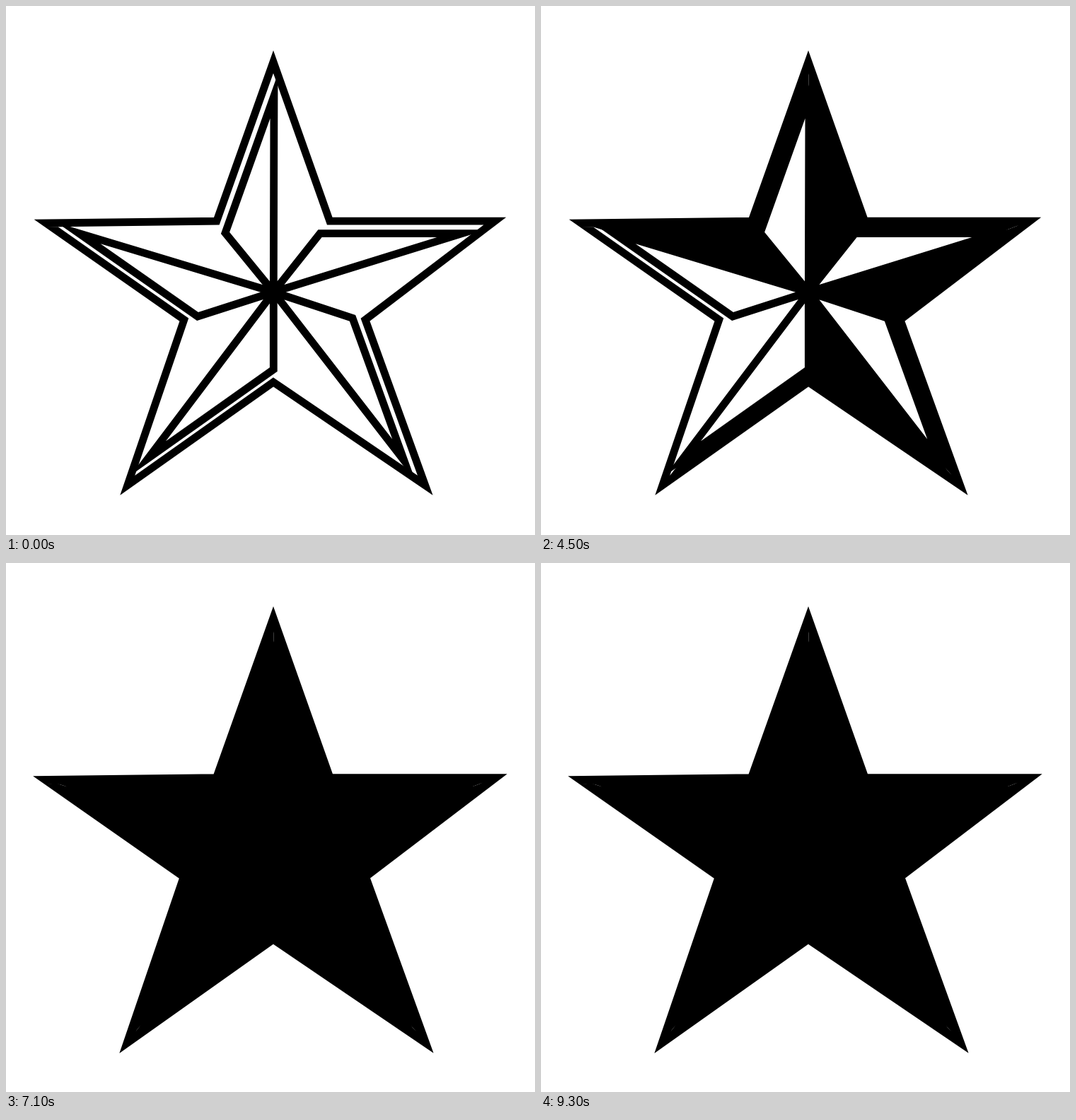
An HTML page with a canvas for the animation above (9.4 s loop, 748 px wide and 748 px high).

```html
<!DOCTYPE html>
<html>
<head>
<meta charset="utf-8">
<style>
  html, body { margin: 0; height: 100%; overflow: hidden; background: #fff; }
  canvas { display: block; width: 100vw; height: 100vh; }
</style>
</head>
<body>
<canvas id="stage" width="748" height="748"></canvas>
<script>
  const ctx = document.getElementById('stage').getContext('2d');
  const LOOP = 9400, FLASH = 5500, LINE = 10.8;
  const center = [378.3, 404.5];

  // Clockwise from the top: outer tip, the notch before it, and the corner of its light facet.
  const arms = [
    { tip: [378, 79], notch: [297.8, 304.2], corner: [310, 321] },
    { tip: [691.2, 304.2], notch: [457.8, 304.2], corner: [444, 321.7] },
    { tip: [592.8, 677.8], notch: [508, 443.6], corner: [490, 441.3] },
    { tip: [171.8, 677.8], notch: [378, 531.8], corner: [378.3, 514] },
    { tip: [56.5, 307], notch: [251.8, 443.7], corner: [271, 439] }
  ];
  // The facet's long edge runs parallel to the outline and a little shorter.
  for (const arm of arms) {
    arm.peak = arm.corner.map((v, k) => v + 0.86 * (arm.tip[k] - arm.notch[k]));
  }

  function trace(points) {
    ctx.beginPath();
    for (const [x, y] of points) ctx.lineTo(x, y);
    ctx.closePath();
  }

  function filledCount(t) {
    if (t >= FLASH) return Math.floor((t - FLASH) / 100) % 2 ? 0 : 10;
    const step = Math.max(0, Math.floor((t - 1300) / 200));
    return Math.min(step, 20 - step);
  }

  function drawStar(count) {
    ctx.clearRect(0, 0, 748, 748);
    ctx.miterLimit = 12;
    ctx.lineWidth = count > 5 ? LINE + 1 : LINE;

    // Shaded halves fill first, each together with the thin gap beside the next arm.
    arms.slice(0, count).forEach((arm, i) => {
      const prev = arms[(i + 4) % 5];
      trace([center, prev.peak, prev.tip, arm.notch, arm.tip, arm.peak, arm.corner]);
      ctx.fill();
    });

    // Light facets follow, beginning with the left arm.
    arms.forEach((arm, i) => {
      trace([center, arm.corner, arm.peak]);
      if (count > 5 + (i + 1) % 5) ctx.fill();
      ctx.stroke();
    });

    trace(arms.flatMap(arm => [arm.notch, arm.tip]));
    ctx.stroke();
  }

  const start = performance.now();
  function frame() {
    drawStar(filledCount((performance.now() - start) % LOOP));
    requestAnimationFrame(frame);
  }
  frame();
</script>
</body>
</html>
```
